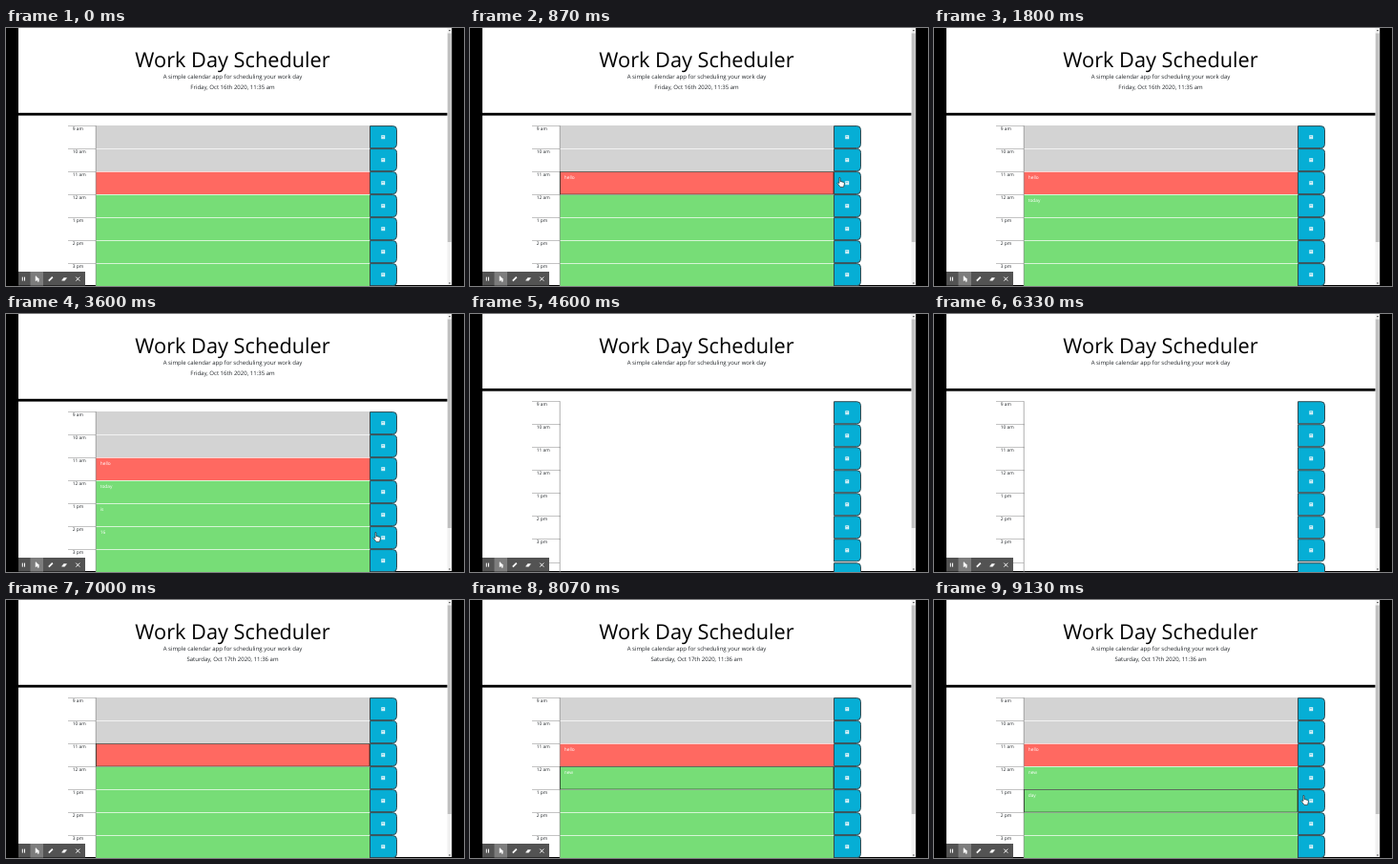
Recreate the animation shown at these times as an HTML page with a canvas. Size 480 by 270 pixels, loop 9190 ms.

```html
<!DOCTYPE html>
<html lang="en">
<head>
<meta charset="utf-8">
<title>Work Day Scheduler</title>
<style>
  html, body { margin: 0; width: 480px; height: 270px; overflow: hidden; background: #000; }
  canvas { display: block; }
</style>
</head>
<body>
<canvas id="stage" width="480" height="270"></canvas>
<script>
const ctx = document.getElementById('stage').getContext('2d');
const LOOP = 9190;
const SCALE = 0.302;
const ROW = 80 * SCALE;
const TOP = 102;
const DATE_LINE = 36 * SCALE;
const HOURS = ['9 am', '10 am', '11 am', '12 am', '1 pm', '2 pm', '3 pm', '4 pm'];
const PAST = '#d3d3d3', PRESENT = '#ff6961', FUTURE = '#77dd77';
const KEY = 75, CLICK = 140, GLIDE = 60;

// A visit to a row: click into it, type, move to its save button
const DAYS = [
  {
    date: 'Friday, Oct 16th 2020, 11:35 am', reload: 4600, ready: 4730, end: 6270,
    visits: [
      { row: 2, text: 'hello', focus: 200, type: 400, save: 800 },
      { row: 3, text: 'today', focus: 1130, type: 1200, save: 1530 },
      { row: 4, text: 'is', focus: 1930, type: 2000, save: 2300 },
      { row: 5, text: '16', focus: 2600, type: 2870, save: 3330, leave: 4200 }
    ]
  },
  {
    date: 'Saturday, Oct 17th 2020, 11:36 am', reload: 6270, ready: 6530, end: LOOP,
    visits: [
      { row: 2, text: 'hello', focus: 6800, type: 7070, save: 7470 },
      { row: 3, text: 'new', focus: 7730, type: 7870, save: 8200 },
      { row: 4, text: 'day', focus: 8470, type: 8600, save: 9065 }
    ]
  }
];

const ICONS = {
  pause: new Path2D('M-1 -2V2M1.2 -2V2'),
  arrow: new Path2D('M-1.5 -3V2.2L0 1L1 3L2 2.5L1 .6H2.4Z'),
  pen: new Path2D('M-2 2L2 -2'),
  eraser: new Path2D('M-2.5 1.6L-.5 -1H2.5L.5 1.6Z'),
  close: new Path2D('M-2 -2L2 2M2 -2L-2 2')
};
const HAND = new Path2D('M2 0Q3 0 3 1V4L6.5 5Q7.6 5.4 7.3 7L6.5 10H3L0 6Q0 5 2 6Z');

const during = (t, a, b) => t >= a && t < b;
const rowY = i => Math.floor(TOP + i * ROW);

function rect(color, x, y, w, h) {
  ctx.fillStyle = color;
  ctx.fillRect(x, y, w, h);
}

function label(text, x, y, px, color = '#212529', align = 'left') {
  ctx.save();
  ctx.translate(x, y);
  ctx.scale(SCALE, SCALE);
  ctx.font = `${px}px "Open Sans", sans-serif`;
  ctx.textRendering = 'geometricPrecision';
  ctx.fillStyle = color;
  ctx.textAlign = align;
  ctx.fillText(text, 0, 0);
  ctx.restore();
}

function icon(path, x, y, fill, stroke, width) {
  ctx.save();
  ctx.translate(x, y);
  if (fill) { ctx.fillStyle = fill; ctx.fill(path); }
  ctx.strokeStyle = stroke;
  ctx.lineWidth = width;
  ctx.stroke(path);
  ctx.restore();
}

function header(date) {
  rect('#fff', 13, 0, 450, 269);
  label('Work Day Scheduler', 237.5, 40.6, 72, '#000', 'center');
  label('A simple calendar app for scheduling your work day', 237.5, 52.8, 20, '#212529', 'center');
  if (date) label(date, 237.5, 63.7, 20, '#212529', 'center');
  rect('#000', 13, 88.8 - (date ? 0 : DATE_LINE), 450, 2.8);
}

function saveButton(y) {
  ctx.beginPath();
  ctx.roundRect(381.5, y + 0.6, 28, ROW - 1.1, [0, 4, 4, 0]);
  ctx.fillStyle = '#06aed5';
  ctx.fill();
  ctx.strokeStyle = '#35494f';
  ctx.lineWidth = 1;
  ctx.stroke();
  const cy = y + ROW / 2;
  rect('#e6f6fa', 393.3, cy - 1.9, 3.9, 4);
  rect('#5cc8e2', 394.1, cy - 1.2, 2, 0.9);
  rect('#5cc8e2', 394.7, cy + 0.5, 1, 0.9);
}

function rows(ready) {
  HOURS.forEach((hour, i) => {
    const y = rowY(i) - (ready ? 0 : DATE_LINE);
    if (ready) {
      rect(i < 2 ? PAST : i === 2 ? PRESENT : FUTURE, 94, y, 287, ROW + 1);
      if (i) rect('rgba(255,255,255,.7)', 94, y, 287, 1);
    }
    rect('#b4b4b4', 65, Math.floor(y), 29, 0.8);
    rect('#8c8c8c', 93.8, y, 0.7, ROW + 1);
    label(hour, 69.7, y + 4.5, 16);
    saveButton(y);
  });
}

function note({ row, text, focus, type, save }, t) {
  const typed = Math.max(0, Math.floor((t - type) / KEY) + 1);
  label(text.slice(0, typed), 98.7, TOP + row * ROW + 7.3, 16, '#fff');
  if (during(t, focus, save + CLICK)) {
    ctx.strokeStyle = 'rgba(25,35,25,.8)';
    ctx.lineWidth = 0.8;
    ctx.strokeRect(94.4, rowY(row) + 0.5, 286.6, ROW - 0.6);
  }
}

function hand({ row, save, leave = save + 250 }, t) {
  if (!during(t, save, leave)) return;
  const p = Math.min(1, (t - save) / GLIDE);
  icon(HAND, 380 + 5 * p * (2 - p), rowY(row) + 6.4, '#fff', '#222', 0.65);
}

function scrollbar() {
  rect('#f1f1f1', 462.5, 0, 4.7, 269);
  rect('#c1c1c1', 462.8, 5.5, 3.9, 218.5);
  rect('#666', 464, 2, 1.8, 1.2);
  rect('#666', 464, 266.4, 1.8, 1.2);
}

function toolbar() {
  rect('#535353', 13, 255, 70, 14.5);
  rect('#7d7d7d', 25.5, 255, 13.5, 14.5);
  const { pause, arrow, pen, eraser, close } = ICONS;
  [pause, arrow, pen, eraser, close].forEach((path, i) => {
    const solid = path === arrow || path === eraser;
    icon(path, 18.3 + i * 14.25, 262.6, solid && '#fff', '#fff', path === pen ? 1.8 : solid ? 0.5 : 1);
  });
}

function draw(t) {
  const day = DAYS.find(d => t < d.end);
  const ready = !during(t, day.reload, day.ready);
  rect('#000', 0, 0, 480, 270);
  header(ready && day.date);
  rows(ready);
  if (ready) day.visits.forEach(v => note(v, t));
  scrollbar();
  toolbar();
  day.visits.forEach(v => hand(v, t));
}

const start = performance.now();
function tick() {
  draw((performance.now() - start) % LOOP);
  requestAnimationFrame(tick);
}
tick();
</script>
</body>
</html>
```
